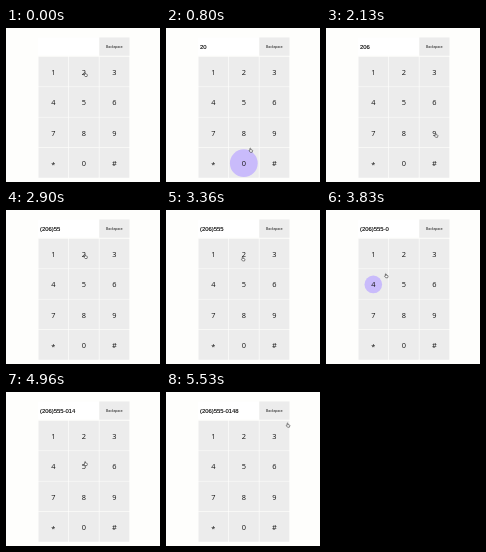
Recreate the animation shown at these times as an HTML page. Size 154 px wide and 154 px high, loop 5560 ms.

```html
<!DOCTYPE html>
<html lang="en">
<head>
<meta charset="utf-8">
<title>Dial pad</title>
<style>
  html, body { margin: 0; width: 100%; height: 100%; overflow: hidden; background: #fefefc; }
  svg { display: block; width: 100vw; height: 100vh; }
  text { fill: #111; }
  .key { font: 7.4px "Open Sans", "Noto Sans", sans-serif; text-anchor: middle; }
  .entry { font: 5.9px "Liberation Sans", Arial, sans-serif; fill: #000; stroke: #000; stroke-width: .12px; }
  .back { font: 3.4px "Liberation Sans", Arial, sans-serif; text-anchor: middle; }
</style>
</head>
<body>
<svg id="stage" viewBox="0 0 154 154" preserveAspectRatio="none">
  <rect width="154" height="154" fill="#fefefc"/>
  <rect x="32" y="9.5" width="61" height="18" fill="#fff"/>
  <g id="pads" fill="#ececec"><rect x="93.3" y="9.5" width="30.2" height="18.2"/></g>
  <g id="ripples" fill="#c9bbfb"></g>
  <g id="labels"><text class="back" x="108.4" y="19.6">Backspace</text></g>
  <text id="entry" class="entry" x="34" y="20.8"></text>
  <path id="cursor" fill="#fff" stroke="#222" stroke-width=".55" stroke-linejoin="round"
    d="M-.9 .3V-1.7Q-.5-2.4-.1-1.7V-.5L1.5-.1Q1.9 .1 1.8.6L1.4 2.1H-.5L-1.7.6Q-1.6 0-.9.3Z"/>
</svg>
<script>
const NS = 'http://www.w3.org/2000/svg';
const LOOP = 5560, RIPPLE = 300;
const $ = id => document.getElementById(id);

function add(parent, tag, attrs, content = '') {
  const el = document.createElementNS(NS, tag);
  for (const name in attrs) el.setAttribute(name, attrs[name]);
  el.textContent = content;
  return parent.appendChild(el);
}

// Key pad
const pos = {};
[...'123456789*0#'].forEach((label, i) => {
  const col = i % 3, row = Math.floor(i / 3);
  const x = 47.3 + col * 30.5, y = 44 + row * 30.4;
  pos[label] = [x, y];
  add($('pads'), 'rect', { x: x - 14.8, y: y - 15.3, width: 29.8, height: 29.8 });
  add($('labels'), 'text', { class: 'key', x, y: y + (label === '*' ? 3.8 : 2.9) }, label);
});

// Highlighted key, ripple start, moment it becomes visible
const presses = [
  ['2', 60], ['0', 645], ['3', 1230], ['9', 2145], ['2', 2600, 2760],
  ['2', 3060], ['4', 3755], ['2', 4130], ['2', 4560], ['5', 5070]
].map(([key, start, shown = start]) => ({
  start, shown,
  dot: add($('ripples'), 'circle', { cx: pos[key][0], cy: pos[key][1] })
}));
const digits = '2065550148';

// Pointer trips: destination, departure, arrival
const trips = [
  ['0', 260, 600], ['3', 740, 1100], ['9', 1480, 1860, true], ['2', 2370, 2630],
  ['4', 3340, 3600], ['2', 3765, 3945], ['5', 4825, 4990]
].map(([key, from, to, soft]) => ({ end: rest(key), from, to, soft }));
trips.push({ end: [125.5, 29.5], from: 5300, to: 5550 });

function rest(key) {
  return [pos[key][0] + 1.8, pos[key][1] + 2.4];
}

function phone(s) {
  if (s.length < 4) return s;
  const tail = s.slice(6);
  return `(${s.slice(0, 3)})${s.slice(3, 6)}${tail ? '-' + tail : ''}`;
}

function pointer(t) {
  let p = rest('2');
  for (const trip of trips) {
    if (t < trip.from) break;
    let k = Math.min(1, (t - trip.from) / (trip.to - trip.from));
    if (trip.soft) k = 1 - (1 - k) ** 2;
    p = p.map((v, i) => v + (trip.end[i] - v) * k);
  }
  return p;
}

function draw(t) {
  let typed = 0;
  for (const { start, shown, dot } of presses) {
    const k = (t - start) / RIPPLE;
    const on = t >= shown;
    if (on) typed++;
    dot.setAttribute('r', on && k < 1 ? 4 + 19 * k : 0);
    dot.setAttribute('opacity', Math.max(0, Math.min(1, (1 - k) / .45)));
  }
  $('entry').textContent = phone(digits.slice(0, typed));
  $('cursor').setAttribute('transform', `translate(${pointer(t)})`);
}

const begin = performance.now();
function tick() {
  draw((performance.now() - begin) % LOOP);
  requestAnimationFrame(tick);
}
tick();
</script>
</body>
</html>
```
